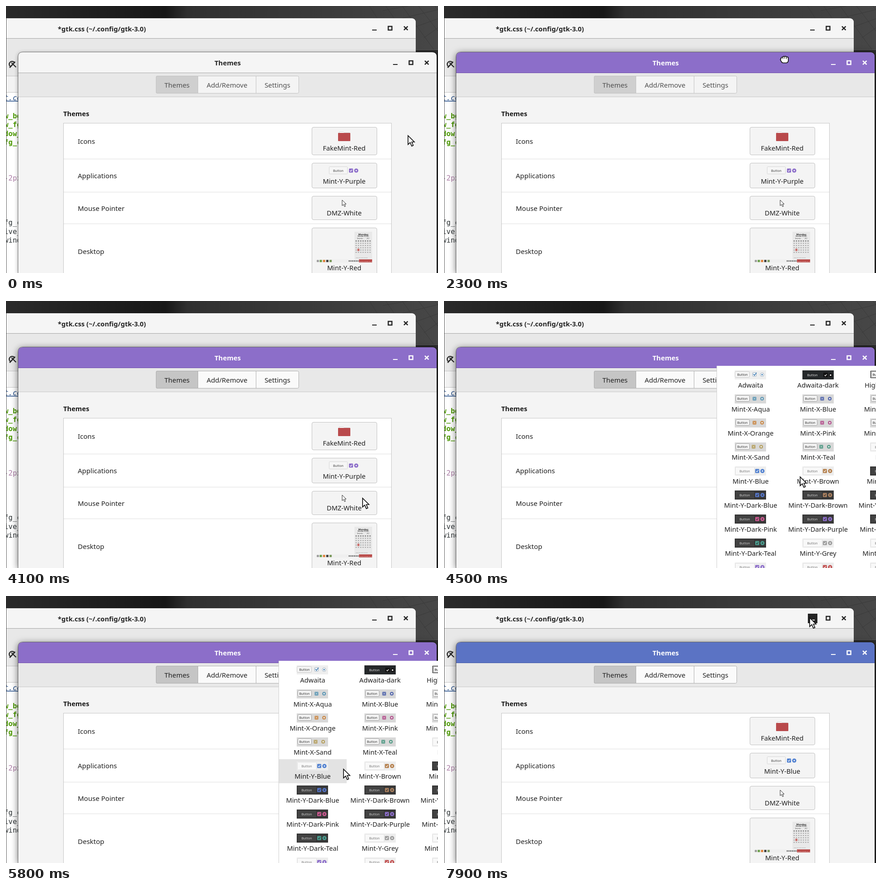
These frames come from a looping animation (951 px wide and 589 px high, 8000 ms). An HTML page:

```html
<!DOCTYPE html>
<html lang="en">
<head>
<meta charset="utf-8">
<title>Theme settings</title>
<style>
html, body { margin: 0; width: 100%; height: 100%; overflow: hidden; background: #222; }
svg {
  display: block; font-family: "Noto Sans", "Open Sans", sans-serif;
  --accent: #8c6ec9; --edge: #7050ad; --check: #8c6ec9;
  --bar: #f5f5f5; --line: #a9a9a9; --glyph: #252525;
  --tab: #f4f4f4; --tabOn: #cfcfcf; --tabInk: #505050; --tabEdge: #c2c2c2;
}
svg.focus { --bar: var(--accent); --line: var(--edge); --glyph: #fff; }
svg.active { --tab: #fafafa; --tabOn: #c5c5c5; --tabInk: #222; --tabEdge: #adadad; }
svg.blue { --accent: #5b73c4; --edge: #435aa8; --check: #5080d0; }
#frame { filter: drop-shadow(0 2px 5px rgba(0,0,0,.4)); }
.focus #frame { filter: drop-shadow(0 3px 8px rgba(0,0,0,.6)); }
.code { font-family: "DejaVu Sans Mono", monospace; white-space: pre; }
</style>
</head>
<body>
<script>
const rect = (x, y, w, h, fill, more = '') =>
  `<rect x="${x}" y="${y}" width="${w}" height="${h}" fill="${fill}" ${more}/>`;
const box = (x, y, w, h, fill, edge, r = 0, more = '') =>
  rect(x + .5, y + .5, w - 1, h - 1, fill, `stroke="${edge}" rx="${r}" ${more}`);
const dot = (x, y, r, fill, more = '') =>
  `<circle cx="${x}" cy="${y}" r="${r}" fill="${fill}" ${more}/>`;
const path = (d, stroke, width = 1, fill = 'none', more = '') =>
  `<path d="${d}" stroke="${stroke}" stroke-width="${width}" fill="${fill}" ${more}/>`;
const text = (x, y, s, size = 15, fill = '#202020', more = '') =>
  `<text x="${x}" y="${y}" font-size="${size}" fill="${fill}" ${more}>${s}</text>`;
const mid = (x, y, s, size, fill, more = '') =>
  text(x, y, s, size, fill, 'text-anchor="middle" ' + more);
const group = (id, body, more = '') => `<g id="${id}" ${more}>${body}</g>`;
const bold = 'font-weight="700"';

const backdrop = () => {
  let s = rect(0, 0, 951, 589, 'url(#sky)');
  for (let i = 0; i < 5; i++)
    s += path(`M${800 + i * 36} 0l${70 + i * 5} 110M${800 + i * 30} ${i * 20 - 10}L951 ${i * 20 - 32}`, '#363636', .7);
  return s + rect(902, 97, 49, 492, '#2d2d2d') + rect(902, 96, 49, 1, '#5a5a5a');
};

// Minimise, maximise and close, laid out around the first one
const windowButtons = (x, y, c) =>
  rect(x - 5, y + 3, 10, 2, c) +
  path(`M${x + 30.5} ${y - 4}h8v8h-8z`, c, 2.5) +
  path(`M${x + 65} ${y - 4.2}l8.4 8.4m0 -8.4l-8.4 8.4`, c, 2.6);
const hotButton = (id, x, y, glyph) => group(id, rect(x, y, 21, 21, '#242424') + glyph);

const editor = () => {
  const code = [
    [208, 't.co', '#204a87', 'font-style="italic" text-decoration="underline"'],
    [247.5, 'w_bg', '#4e9a06', bold], [267, 'w_fg', '#4e9a06', bold],
    [286.5, 'dow_', '#4e9a06', bold], [306, 'fg_c', '#4e9a06', bold],
    [384.5, '-2px', '#ad7fa8'], [483, 'fg_c', '#2e3436'],
    [502.5, 'ive_', '#2e3436'], [522, 'wind', '#2e3436'],
  ];
  return `<path d="M0 589V27H892q10 0 10 10V589z" fill="#e8e8e8"/>` +
    `<path d="M0 71V27H892q10 0 10 10V71z" fill="#f5f5f5"/>` +
    rect(0, 71, 902, 1, '#a5a5a5') + rect(0, 154, 28, 1, '#c4c4c4') +
    rect(0, 155, 28, 35, '#f3f3f3') + rect(0, 190, 28, 1, '#c4c4c4') + rect(0, 191, 28, 398, '#fff') +
    text(114, 55.5, '*gtk.css (~/.config/gtk-3.0)', 14.7, '#252525', bold) +
    windowButtons(811, 49, '#252525') +
    path('M9 133a6 6 0 0 1 9 -9M12 125l10 10', '#2b2b2b', 2.4) +
    path('M8 136l12 -13', '#2b2b2b', 2.6) +
    code.map(([y, s, c, more = '']) => text(-4, y, s, 15.5, c, 'class="code" ' + more)).join('') +
    rect(0, 27, 1, 562, '#555');
};

const tick = (x, y, c) => path(`M${x - 2.3} ${y}l1.8 1.9l3 -3.8`, c, 1.2);
const checks = (x, y, c, hole = '#fff') =>
  rect(x - 4.5, y - 4.5, 9, 9, c, 'rx="1.5"') + tick(x, y, hole) +
  dot(x + 11.5, y, 4.6, c) + dot(x + 11.5, y, 1.5, hole);

const arrow = 'M0 0V19.5L4.7 15.2L8.2 23L11.5 21.5L8.2 14H14Z';

const desktopPreview = () => {
  let s = rect(767, 498, 39, 61, '#e9e9e9') +
    mid(786.5, 505.5, 'Monday', 5.5, '#333', bold) +
    mid(786.5, 508.8, 'November 28, 2021', 2.6, '#444', bold) +
    text(773, 513.5, 'November', 2.6, '#444') + text(794, 513.5, '2021', 2.6, '#444') +
    text(770, 556, 'Date and Time Settings', 2.4, '#666');
  for (let row = 0; row < 6; row++)
    for (let col = 0; col < 7; col++)
      s += rect(769.5 + col * 5.1, 517.5 + row * 5, 2.6, 1.8, row ? '#9a9a9a' : '#555');
  s += rect(773.5, 535.5, 4.5, 5, '#c96a66') + rect(682, 559, 124, 7, '#efefef');
  ['#999', '#6da04b', '#e0823d', '#444', '#7f9c60'].forEach((c, i) => {
    s += i ? rect(690.5 + (i - 1) * 7.2, 560, 5, 5, c) : dot(686.5, 562.5, 2.5, c);
  });
  for (let i = 0; i < 6; i++) s += rect(754.5 + i * 3.8, 561, 2.3, 3, '#666');
  return s + rect(777, 559, 29, 6.5, '#b94a48') +
    text(778.5, 563.5, 'Monday November 28, 12:04', 2.2, '#fff');
};

const themes = () => {
  const button = (y, h, more) => box(673, y, 144, h, '#f4f4f4', '#c0c0c0', 3.5, more);
  const rows = [['Icons', 304], ['Applications', 380], ['Mouse Pointer', 451.5], ['Desktop', 547]];
  const tab = (x, w, name) => mid(x + w / 2, 179.5, name, 14.9, 'var(--tabInk)');
  return group('frame', `<path d="M27 589V112q0 -10 10 -10H938q10 0 10 10V589z" fill="#f4f4f4"/>`) +
    `<path d="M27 148V112q0 -10 10 -10H938q10 0 10 10V148z" fill="var(--bar)"/>` +
    path('M26.5 589V112q0 -10.500 10.500 -10.500H938q10.500 0 10.500 10.500V589', '#000', 1, 'none', 'opacity=".45"') +
    rect(27, 147, 921, 1, 'var(--line)') +
    rect(27, 148, 921, 52, '#e8e8e8') + rect(27, 200, 921, 1, '#c9c9c9') +
    mid(488, 131, 'Themes', 14.9, 'var(--glyph)', bold) + windowButtons(857, 125, 'var(--glyph)') +
    box(330, 154, 315, 39, 'var(--tab)', 'var(--tabEdge)', 3) +
    `<path d="M422.5 154.5H333q-2.5 0 -2.5 2.5V190q0 2.5 2.5 2.5H422.5z" fill="var(--tabOn)" stroke="var(--tabEdge)"/>` +
    rect(550, 154, 1, 39, 'var(--tabEdge)') +
    tab(330, 93, 'Themes') + tab(423, 127, 'Add/Remove') + tab(550, 95, 'Settings') +
    text(126, 242.5, 'Themes', 14.7, '#1a1a1a', bold) +
    box(126, 258, 723, 400, '#fff', '#c6c6c6') +
    [337, 410, 480].map(y => rect(127, y, 721, 1, '#dedede')).join('') +
    rows.map(([s, y]) => text(158, y, s)).join('') +
    button(267, 62) + button(346, 56, 'id="appButton"') + button(419, 53) + button(489, 110) +
    path('M733.5 290V277.5h9l2 2h12V290z', '#ccc', .8, '#fff') + rect(731, 280, 27, 18, '#b94a4c', 'rx="1"') +
    mid(744.5, 318.5, 'FakeMint-Red', 14.6) +
    box(711, 354, 41, 17, '#f6f6f6', '#d6d6d6', 1) + mid(731.5, 365.5, 'Button', 7.2, '#444') +
    checks(759.5, 363, 'var(--check)') +
    mid(744.5, 391.5, 'Mint-Y-Purple', 14.6, '#202020', 'id="appName"') +
    path(arrow, '#222', 1.5, '#fff', 'transform="translate(740 428) scale(.64)"') +
    mid(744.5, 461.5, 'DMZ-White', 14.6) +
    desktopPreview() + mid(744.5, 582.5, 'Mint-Y-Red', 14.6);
};

// Each entry: name, style (A light, D dark, H high contrast, X bevelled, Y flat, K flat dark), colour
const choices = `Adwaita A 4a85b8|Adwaita-dark D fff|HighContrast H 000
Mint-X-Aqua X 6199b5|Mint-X-Blue X 5568ac|Mint-X-Brown X a5805c
Mint-X-Orange X c98a4b|Mint-X-Pink X b4568f|Mint-X-Purple X 8a64aa
Mint-X-Sand X b5a062|Mint-X-Teal X 549a86|Mint-Y Y 86b455
Mint-Y-Blue Y 5080d0|Mint-Y-Brown Y b5814f|Mint-Y-Dark K 86b455
Mint-Y-Dark-Blue K 5574c4|Mint-Y-Dark-Brown K a9805f|Mint-Y-Dark-Grey K 9d9d9d
Mint-Y-Dark-Pink K c9588f|Mint-Y-Dark-Purple K 8c6ec9|Mint-Y-Dark-Red K c15252
Mint-Y-Dark-Teal K 4a9d8f|Mint-Y-Grey Y 9d9d9d|Mint-Y-Orange Y db7a45
Mint-Y-Purple Y 8c6ec9|Mint-Y-Red Y c15252|Mint-Y-Sand Y c8ac69`
  .split('\n').map(line => line.split('|').map(s => s.split(' ')));

const preview = (x, y, kind, c, shift) => {
  const base = fill => rect(x, y, 69, 20, fill);
  const label = (dx, dy, fill) => mid(x + dx, y + dy, 'Button', 7.2, fill);
  if (kind === 'Y' || kind === 'K') {
    const dark = kind === 'K';
    return base(dark ? '#383838' : '#ededed') +
      box(x + 1, y + 1, 43, 18, dark ? '#424242' : '#f8f8f8', dark ? '#303030' : '#dedede', 1) +
      label(22, 12.6, dark ? '#ccc' : '#777') + checks(x + 49.5, y + 10, c, dark ? '#333' : '#fff');
  }
  if (kind === 'D')
    return base('#25282a') + label(22, 13, '#ddd') +
      rect(x + 46, y + 5, 10, 10, '#111') + tick(x + 51, y + 10.5, c) +
      dot(x + 62, y + 10.5, 4, '#111') + dot(x + 62, y + 10.5, 1.7, c);
  if (kind === 'H')
    return base('#fff') + path(`M${x + 1.5} ${y + 1.5}h32v15h-32z`, '#000', 1.2) +
      path(`M${x + 3.5} ${y + 3.5}h28v11h-28z`, '#000', .7, 'none', 'stroke-dasharray="1 1"') + label(17, 12, '#000');
  const light = kind === 'A', cx = x + 43.5 + shift, cy = y + 9;
  const mark = light
    ? box(cx - 4.5, cy - 4.5, 9, 9, '#fff', '#9ab', 1) + path(`M${cx - 2.5} ${cy - 1}l2.5 3l4.5 -6`, c, 1.8)
    : rect(cx - 4, cy - 3.5, 8, 8, c, 'rx="1"') + path(`M${cx - 2} ${cy - 1.5}l4 4m0 -4l-4 4`, '#eee', 1);
  return base(light ? '#eee' : '#d8d8d8') +
    box(x + (light ? 0 : 2), y + 2, light ? 33 : 31, 14, '#f4f4f4', light ? '#c8c8c8' : '#a2a2a2', 2) +
    label(17, light ? 11.5 : 12, '#333') + mark +
    dot(cx + 16.7, cy + .5, 4, light ? '#fff' : c, light ? 'stroke="#9ab"' : '') +
    dot(cx + 16.7, cy + .5, 1.7, light ? c : '#eee');
};

const popup = () => rect(600, 143, 1, 446, '#cfcfcf') + rect(601, 143, 350, 446, '#fff') +
  rect(601, 0, 149, 53, '#e3e3e3', 'id="pick"') +
  choices.map((line, row) => line.map(([name, kind, c], col) => {
    const x = 640 + col * 149, y = 153 + row * 53;
    return preview(x, y, kind, '#' + c, row === 3 ? -2 : 0) +
      mid(675 + col * 148.3, y + 38, name, 14.6);
  }).join('')).join('');

const fist = path('M2 5q1 -3 4 -2q1 -3 4 -1.5q3 -1.5 4 1q4 -1 4 3v4q0 5 -4 6H6q-3 -1 -4 -4l-1.5 -3q0 -2 1.5 -2z', '#111', 1.7, '#fff') +
  path('M6 3v4M10 2v4M14 3v4', '#111', 1.2);

document.body.innerHTML = `<svg width="951" height="589" viewBox="0 0 951 589">
<defs><linearGradient id="sky">
<stop stop-color="#2b2b2b"/><stop offset=".2" stop-color="#202020"/><stop offset=".37" stop-color="#181818"/>
<stop offset=".42" stop-color="#303030"/><stop offset=".7" stop-color="#3a3a3a"/><stop offset="1" stop-color="#474747"/>
</linearGradient></defs>` +
  backdrop() + editor() + hotButton('editorMin', 801, 39, rect(806, 52, 10, 2, '#fff')) +
  themes() + hotButton('themesMin', 847, 114, rect(852, 128, 10, 2, '#fff')) +
  hotButton('themesMax', 881, 114, path('M887.5 121h8v8h-8z', '#fff', 2.5)) +
  group('popup', popup()) +
  group('cursor', group('arrow', path(arrow, '#111', 1.7, '#fff')) + group('fist', fist)) + '</svg>';

// Pointer stops: time, x, y
const stops = [
  [0, 885, 286], [300, 864, 183], [500, 870, 160], [600, 884, 136], [700, 893, 126], [800, 905, 128],
  [900, 913, 131], [1000, 897, 127], [1100, 866, 125], [1200, 858, 124], [1300, 855, 130], [1400, 851, 169],
  [1500, 838, 214], [1600, 831, 233], [1800, 825, 180], [1900, 814, 127], [2100, 790, 120], [2200, 762, 114],
  [2300, 740, 110], [2400, 731, 109], [3700, 765, 300], [3800, 796, 435], [4100, 785, 435],
  [4300, 784, 388], [4800, 784, 392], [5000, 790, 405], [5200, 793, 422], [5400, 795, 458], [5700, 770, 408],
  [5800, 743, 382], [6000, 725, 386], [6200, 707.5, 389], [6400, 707, 389.5], [7200, 812, 167],
  [7500, 815, 98], [7700, 815, 60], [7900, 805, 48],
];
// Highlighted popup entry: time, column, row
const picks = [[0, 0, -9], [4800, 1, 4], [5200, 1, 5], [5700, 1, 4], [5800, 0, 4]];

const $ = id => document.getElementById(id);
const root = document.querySelector('svg');
const at = (keys, t) => keys.findLast(k => k[0] <= t);
const show = (id, on) => { $(id).style.display = on ? '' : 'none'; };

const draw = t => {
  const within = (a, b) => t >= a && t < b;
  root.classList.toggle('focus', t >= 2300);
  root.classList.toggle('active', t >= 3700);
  root.classList.toggle('blue', t >= 7700);
  show('themesMax', within(600, 900) || within(1000, 1100));
  show('themesMin', within(1100, 1500));
  show('editorMin', t >= 7900);
  show('popup', within(4500, 7500));
  show('fist', within(2300, 3700));
  show('arrow', !within(2300, 3700));
  $('appButton').setAttribute('fill', within(4300, 7500) ? '#fdfdfd' : '#f4f4f4');
  $('appName').textContent = t < 7500 ? 'Mint-Y-Purple' : 'Mint-Y-Blue';
  const [, col, row] = at(picks, t);
  $('pick').setAttribute('x', 601 + col * 149);
  $('pick').setAttribute('y', 148 + row * 53);
  const [, x, y] = at(stops, t);
  $('cursor').setAttribute('transform', `translate(${x} ${y})`);
};

const start = performance.now();
const loop = () => {
  draw((performance.now() - start) % 8000);
  requestAnimationFrame(loop);
};
loop();
</script>
</body>
</html>
```
